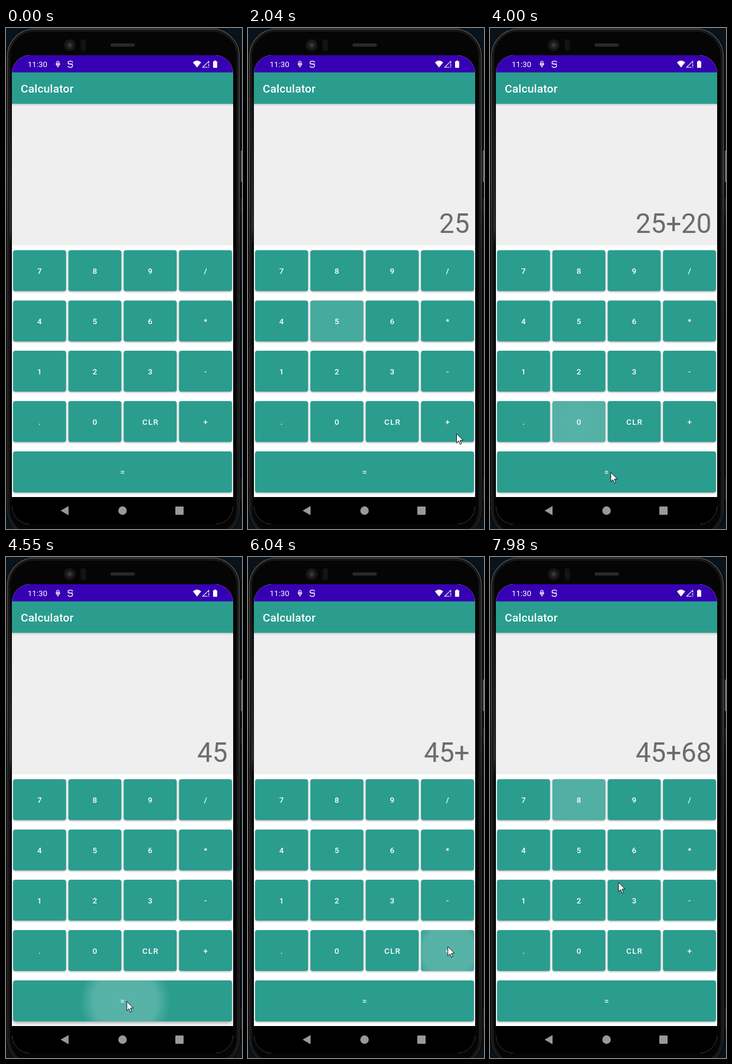
An HTML page with a canvas for the animation above (8 s loop, 400 by 846 pixels).

```html
<!DOCTYPE html>
<html lang="en">
<head>
<meta charset="utf-8">
<title>Calculator</title>
<style>
  html, body { margin: 0; width: 100%; height: 100%; overflow: hidden; background: #08131b; }
  canvas { display: block; width: 400px; height: 846px; }
</style>
</head>
<body>
<canvas id="stage"></canvas>
<script>
const W = 400, H = 846, LOOP = 8000;
const TEAL = '#2a9d8f';
const canvas = document.getElementById('stage');
const ctx = canvas.getContext('2d');
const dpr = window.devicePixelRatio || 1;
canvas.width = W * dpr;
canvas.height = H * dpr;

const clamp = (v, a = 0, b = 1) => Math.min(b, Math.max(a, v));
const lerp = (a, b, k) => a + (b - a) * k;
const smooth = k => k * k * (3 - 2 * k);

// Keypad
const buttons = [];
['789/', '456*', '123-', '.0C+'].forEach((row, r) => {
  [...row].forEach((key, c) => buttons.push({
    key, label: key === 'C' ? 'CLR' : key,
    x: 12 + c * 93.75, y: 375.3 + r * 84.9, w: 89.8, h: 69
  }));
});
buttons.push({ key: '=', label: '=', x: 12, y: 714.9, w: 371, h: 69.4 });

// Each tap: key, press time, release time, touch point, display after release
const taps = [
  { key: '2', down: 840, up: 990, x: 148, y: 582, text: '2' },
  { key: '5', down: 1450, up: 1560, x: 146, y: 500, text: '25' },
  { key: '+', down: 2280, up: 2400, x: 353, y: 684, text: '25+' },
  { key: '2', down: 3140, up: 3290, x: 141, y: 583, text: '25+2' },
  { key: '0', down: 3540, up: 3660, x: 150, y: 668, text: '25+20' },
  { key: '=', down: 4410, up: 4500, x: 204, y: 750, text: '45' },
  { key: '+', down: 5700, up: 5830, x: 345, y: 668, text: '45+' },
  { key: '6', down: 6795, up: 6900, x: 238, y: 500, text: '45+6' },
  { key: '8', down: 7490, up: 7590, x: 150, y: 415, text: '45+68' }
];

// Pointer stops: time, x, y
const path = [
  [120, 337, 820], [800, 148, 582], [1010, 148, 582],
  [1400, 146, 500], [1600, 146, 500],
  [2020, 353, 684.5], [2550, 353, 684.5],
  [3080, 142, 587], [3320, 142, 587],
  [3500, 150, 668], [3690, 150, 668],
  [3990, 204.3, 750], [4600, 204.3, 750],
  [5150, 257.3, 685], [5550, 345, 668], [5950, 345, 668],
  [6540, 239, 503], [6830, 239, 503],
  [6950, 197.4, 461], [7250, 150, 415], [7620, 150, 415],
  [7980, 217.3, 549]
];

function roundRect(x, y, w, h, r, fill) {
  ctx.beginPath();
  ctx.roundRect(x, y, w, h, r);
  if (fill) { ctx.fillStyle = fill; ctx.fill(); }
}

function rect(x, y, w, h, fill) {
  ctx.fillStyle = fill;
  ctx.fillRect(x, y, w, h);
}

function disc(x, y, r, fill) {
  ctx.beginPath();
  ctx.arc(x, y, r, 0, Math.PI * 2);
  ctx.fillStyle = fill;
  ctx.fill();
}

function poly(points, fill) {
  ctx.beginPath();
  points.forEach(([x, y]) => ctx.lineTo(x, y));
  ctx.closePath();
  if (fill) { ctx.fillStyle = fill; ctx.fill(); }
}

function text(str, x, y, size, weight, color, align = 'left', spacing = 0) {
  ctx.font = `${weight} ${size}px Roboto, sans-serif`;
  ctx.letterSpacing = spacing + 'px';
  ctx.textAlign = align;
  ctx.fillStyle = color;
  ctx.fillText(str, x, y);
  ctx.letterSpacing = '0px';
}

function strokePath(d, width) {
  ctx.strokeStyle = '#fff';
  ctx.lineWidth = width;
  ctx.stroke(new Path2D(d));
}

function drawPhone() {
  rect(0, 0, W, H, '#08131b');
  rect(397, 207, 3, 53, '#6b5d5c');
  rect(397, 288, 2.5, 27, '#2a2d30');
  rect(397, 315, 2.5, 115, '#171b1e');
  rect(397, 760, 2.5, 38, '#20262a');

  roundRect(0, 0, 398, 862, 49, '#050505');
  const rim = ctx.createLinearGradient(0, 0, 0, H);
  rim.addColorStop(0, '#4c4c4c');
  rim.addColorStop(0.3, '#5a5a5a');
  rim.addColorStop(0.45, '#333');
  rim.addColorStop(1, '#2a2a2a');
  ctx.strokeStyle = rim;
  ctx.lineWidth = 1.6;
  roundRect(2.4, 1.6, 393, 858, 46);
  ctx.stroke();
  ctx.strokeStyle = '#191919';
  ctx.lineWidth = 3;
  roundRect(5, 4.5, 387.5, 852, 43);
  ctx.stroke();
  const sheen = ctx.createLinearGradient(0, 40, 0, 370);
  sheen.addColorStop(0, 'rgba(60,60,60,0)');
  sheen.addColorStop(0.9, 'rgba(60,60,60,.75)');
  sheen.addColorStop(1, 'rgba(60,60,60,0)');
  rect(6, 40, 3, 330, sheen);

  disc(108, 29, 10, '#161616');
  disc(108, 29, 6, '#232323');
  disc(108, 29, 3, '#393939');
  roundRect(126.5, 19, 9, 20, 4.5, '#131313');
  roundRect(177, 26, 41.5, 5.5, 2.7, '#292929');
}

function drawStatus() {
  rect(10, 46, 375, 30, '#3700b3');
  text('11:30', 36.8, 66.2, 13.4, 400, '#fff');

  strokePath('M84.4 60.2 L88 66 L91.6 60.2 M85.3 60 L88 62.7 L90.7 60', 1.1);
  strokePath('M86 58 a2 2 0 1 1 4 0 a2 2 0 1 1 -4 0', 1.2);
  strokePath('M112.8 58.3 V57.6 Q112.8 55.8 109 55.8 Q105.2 55.8 105.2 58 Q105.2 60.8 109 60.8' +
    ' Q112.8 60.8 112.8 63.7 Q112.8 66.5 109 66.5 Q105.2 66.5 105.2 64', 1.3);
  strokePath('M104.5 60.8 H113.5', 1.1);

  ctx.fillStyle = '#fff';
  ctx.fill(new Path2D('M316.8 58 Q323.8 51.8 330.8 58 L323.8 66.8 Z'));
  strokePath('M341.7 66.3 H333.4 L343.6 56.2 V60', 1.1);
  rect(343, 61, 1.2, 3.6, '#fff');
  rect(343, 65.7, 1.2, 1.3, '#fff');
  roundRect(351, 56.2, 7, 11, 1, '#fff');
  rect(353, 55, 3, 1.6, '#fff');
}

function drawRipple(b, tap, age) {
  const grow = clamp(age / 450);
  const alpha = 0.215 * Math.min(1, age / 80) * (1 - clamp((age - 450) / 375));
  if (alpha <= 0) return;
  const x = lerp(tap.x, b.x + b.w / 2, grow);
  const y = lerp(tap.y, b.y + b.h / 2, grow);
  const r = Math.max(1, (b.w > 100 ? 245 : 82) * grow);
  const g = ctx.createRadialGradient(x, y, 0, x, y, r);
  g.addColorStop(0, `rgba(255,255,255,${alpha})`);
  g.addColorStop(0.7, `rgba(255,255,255,${alpha * 0.96})`);
  g.addColorStop(1, 'rgba(255,255,255,0)');
  ctx.save();
  roundRect(b.x, b.y, b.w, b.h, 3.8);
  ctx.clip();
  rect(b.x, b.y, b.w, b.h, g);
  ctx.restore();
}

function drawButton(b, t) {
  const mine = taps.filter(tap => tap.key === b.key && t >= tap.down);
  const lift = mine.reduce((m, tap) => Math.max(m,
    clamp((t - tap.down) / 80) * (1 - clamp((t - tap.up) / 120))), 0);
  ctx.save();
  ctx.shadowColor = `rgba(0,0,0,${lerp(0.32, 0.36, lift)})`;
  ctx.shadowBlur = lerp(3, 8, lift) * dpr;
  ctx.shadowOffsetY = lerp(1.2, 4, lift) * dpr;
  roundRect(b.x, b.y, b.w, b.h, 3.8, TEAL);
  ctx.restore();
  mine.forEach(tap => drawRipple(b, tap, t - tap.down));
  text(b.label, b.x + b.w / 2 + 0.6, b.y + b.h / 2 + 5, 13.36, 500, '#fff', 'center', 1.19);
}

function drawScreen(t) {
  ctx.save();
  roundRect(10, 46, 375, 792, 31);
  ctx.clip();
  rect(10, 46, 375, 792, '#fff');
  rect(10, 128, 375, 239, '#efefef');
  const shade = ctx.createLinearGradient(0, 128, 0, 132);
  shade.addColorStop(0, 'rgba(0,0,0,.16)');
  shade.addColorStop(1, 'rgba(0,0,0,0)');
  rect(10, 128, 375, 4, shade);
  rect(10, 75, 375, 53, TEAL);
  drawStatus();
  rect(10, 75, 375, 1, TEAL);
  text('Calculator', 25, 109.2, 19.1, 500, '#fff', 'left', 0.24);

  const shown = taps.filter(tap => t >= tap.up).pop();
  if (shown) text(shown.text, 375.6, 346, 45.8, 400, '#6c6c6c', 'right');

  buttons.forEach(b => drawButton(b, t));

  rect(10, 792, 375, 46, '#000');
  poly([[92.5, 815], [106, 807.2], [106, 822.8]], '#999');
  disc(197.5, 815, 7.2, '#999');
  roundRect(287, 808, 14, 14, 1, '#999');
  ctx.restore();
}

function drawPointer(t) {
  if (t < path[0][0]) return;
  let i = path.findIndex(p => p[0] > t);
  if (i < 0) i = path.length - 1;
  const [t0, x0, y0] = path[i - 1], [t1, x1, y1] = path[i];
  const k = smooth(clamp((t - t0) / (t1 - t0)));
  ctx.save();
  ctx.translate(lerp(x0, x1, k), lerp(y0, y1, k));
  poly([[0.5, 0.5], [0.5, 16.2], [4.1, 12.8], [6.6, 18.6], [9, 17.5], [6.5, 11.9], [11.5, 11.6]], '#fff');
  ctx.strokeStyle = '#111';
  ctx.lineWidth = 1;
  ctx.lineJoin = 'round';
  ctx.stroke();
  ctx.restore();
}

function frame(now) {
  const t = Math.max(0, now - start) % LOOP;
  ctx.setTransform(dpr, 0, 0, dpr, 0, 0);
  drawPhone();
  drawScreen(t);
  drawPointer(t);
  requestAnimationFrame(frame);
}

const start = performance.now();
frame(start);
</script>
</body>
</html>
```
